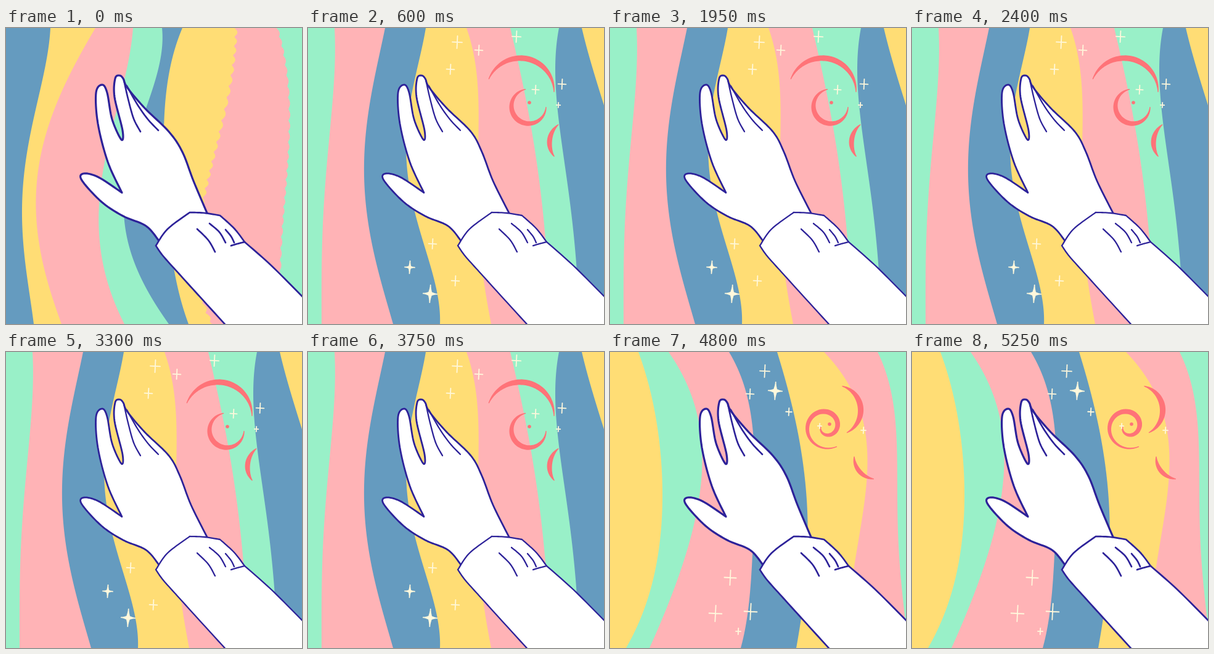
An HTML page with a canvas for the animation above (5.4 s loop, 480 px wide and 480 px high).

```html
<!DOCTYPE html>
<html lang="en">
<head>
<meta charset="utf-8">
<title>Waving hand</title>
<style>
  html, body { margin: 0; width: 100%; height: 100%; overflow: hidden; }
  canvas { display: block; width: 480px; height: 480px; }
</style>
</head>
<body>
<canvas id="stage" width="480" height="480"></canvas>
<script>
const ctx = document.getElementById('stage').getContext('2d');
const SIZE = 480, STEP = 150;
const COLORS = { b: '#659bbf', y: '#ffdd75', p: '#ffb3b6', g: '#99f0c8' };
const INK = '#2d2299', CORAL = '#ff7378', CREAM = '#fff8dc';

// Heights of the five key points of every stripe edge (Chebyshev nodes)
const LEVELS = [0, 1, 2, 3, 4].map(i => SIZE / 2 * (1 - Math.cos(Math.PI * i / 4)));

function polygon(pts) {
  const path = new Path2D();
  pts.forEach(([x, y]) => path.lineTo(x, y));
  return path;
}

function spline(pts, detail = 10) {
  const out = [pts[0]];
  for (let i = 0; i < pts.length - 1; i++) {
    const b = pts[i], c = pts[i + 1], a = pts[i - 1] || b, d = pts[i + 2] || c;
    for (let s = 1; s <= detail; s++) {
      const t = s / detail;
      out.push([0, 1].map(k => b[k] + 0.5 * t * (c[k] - a[k] +
        t * (2 * a[k] - 5 * b[k] + 4 * c[k] - d[k] +
        t * (3 * (b[k] - c[k]) + d[k] - a[k])))));
    }
  }
  return out;
}

// "x y x y ..." becomes a smooth line; "|" marks a sharp corner
function curve(text) {
  return text.split('|').flatMap(part => {
    const n = part.trim().split(/\s+/).map(Number);
    return spline(Array.from({ length: n.length / 2 }, (_, i) => [n[2 * i], n[2 * i + 1]]));
  });
}

// Quartic through the key points of an edge
function edgeAt(y, xs) {
  return xs.reduce((sum, x, i) => sum + LEVELS.reduce((term, level, j) =>
    j === i ? term : term * (y - level) / (LEVELS[i] - level), x), 0);
}

// Everything left of an edge; scallop adds small round bumps
function stripe(xs, scallop) {
  const pts = [[0, 0]];
  for (let y = 0; y <= SIZE; y += 2) {
    const bump = Math.abs(Math.sin(y / 5.2 + Math.sin(y / 40))) - 0.5;
    pts.push([edgeAt(y, xs) + scallop * bump, y]);
  }
  return polygon([...pts, [0, SIZE]]);
}

// Brush mark along a spiral arc, thin at both ends; angles in degrees
function swirl(cx, cy, r0, r1, from, to, width) {
  const outer = [], inner = [];
  for (let t = 0; t <= 1; t += 1 / 64) {
    const angle = (from + (to - from) * t) * Math.PI / 180;
    const r = r0 + (r1 - r0) * t, w = 0.6 + width / 2 * Math.sin(Math.PI * t);
    const at = d => [cx + d * Math.cos(angle), cy + d * Math.sin(angle)];
    outer.push(at(r + w));
    inner.unshift(at(r - w));
  }
  return polygon([...outer, ...inner]);
}

// lean moves the back of the hand sideways
const hand = lean => polygon(curve(
  '248 345 227 321 190 305 155 282 123 247 126 236 150 242 188 267 | ' +
  '188 267 165 217 149 155 146 105 156 92 164 105 172 148 187 181 189 166 176 112 ' +
  `177 82 184 77 190 82 197 97 225 130 264 168 ${286 + lean} 201 ${304 + lean} 248 326 300`));

const cuff = curve('243 353 262 326 298 299 | 298 299 322 300 347 304 | ' +
  '347 304 370 325 387 347 | 387 347 430 385 480 435 490 446');
const arm = curve('243 353 255 370 281 399 310 431 362 488');
const sleeve = polygon([...cuff, [490, 490], ...arm.slice().reverse()]);
const fingers = ['191 84 198 115 207 147 218 168', '196 94 213 124 230 148 247 166']
  .map(text => polygon(curve(text)));
const folds = ['310 326 328 344 339 363', '330 317 346 331 356 348', '356 327 365 338 370 348',
  '365 353 375 350 387 347'].map(text => polygon(curve(text)));

const scenes = [
  {
    order: 'bypgbypg',
    edges: [
      [72, 62, 29, 35, 45], [145, 106, 51, 67, 90], [206, 195, 156, 164, 192],
      [253, 246, 195, 221, 264], [286, 265, 257, 276, 296],
      [373, 367, 329, 312, 334], [440, 455, 455, 445, 450]
    ],
    scallop: { 5: 5, 6: 3 },
    lean: 0, width: 3,
    swirls: [], plus: [], stars: []
  },
  {
    order: 'gpbypgby',
    edges: [
      [43, 43, 29, 22, 22], [125, 110, 91, 118, 138], [191, 176, 162, 205, 214],
      [257, 273, 275, 285, 297], [328, 344, 374, 390, 394],
      [407, 401, 419, 437, 441], [444, 463, 515, 560, 580]
    ],
    lean: -4, width: 2.6,
    swirls: [
      [345, 104, 56, 54, 202, 360, 8], [358, 127, 28, 28, -100, -358, 7],
      [428, 190, 40, 34, -123, -213, 7]
    ],
    dot: [359, 121],
    plus: [[242, 23, 10], [277, 36, 8], [231, 67, 8], [338, 14, 9], [369, 100, 7],
      [412, 91, 8], [406, 125, 4], [202, 350, 8], [239, 410, 8]],
    stars: [[165, 388, 10], [198, 431, 14]]
  },
  {
    order: 'ygpbypg',
    edges: [
      [46, 67, 85, 58, 26], [95, 132, 144, 94, 64], [193, 222, 234, 225, 212],
      [271, 291, 319, 313, 302], [347, 396, 413, 388, 385], [434, 457, 466, 476, 484]
    ],
    lean: 0, width: 3,
    swirls: [
      [366, 94, 40, 41, -75, 64, 8], [350, 121, 37, 8, 61, 540, 7],
      [431, 170, 35, 36, 181, 95, 6]
    ],
    dot: [356, 117],
    plus: [[251, 31, 10], [227, 68, 8], [290, 97, 6], [340, 120, 4], [411, 127, 5],
      [195, 366, 12], [171, 424, 13], [228, 421, 13], [208, 453, 5]],
    stars: [[268, 63, 14]]
  }
];

function fill(path, color) {
  ctx.fillStyle = color;
  ctx.fill(path);
}

// Four-pointed star; a waist of 0 leaves a bare plus sign
function spark([x, y, r], waist) {
  const k = r * waist, w = r * 0.8;
  ctx.save();
  ctx.translate(x, y);
  ctx.rotate(0.05);
  ctx.lineWidth = 1.8;
  ctx.strokeStyle = CREAM;
  ctx.stroke(new Path2D(`M0 ${-r}V${r}M${-w} 0H${w}`));
  fill(polygon([[0, -r], [k, -k], [w, 0], [k, k], [0, r], [-k, k], [-w, 0], [-k, -k]]), CREAM);
  ctx.restore();
}

function draw(s) {
  ctx.lineCap = ctx.lineJoin = 'round';
  ctx.fillStyle = COLORS[s.order.at(-1)];
  ctx.fillRect(0, 0, SIZE, SIZE);
  for (let i = s.edges.length - 1; i >= 0; i--) {
    fill(stripe(s.edges[i], s.scallop?.[i] ?? 0), COLORS[s.order[i]]);
  }

  s.swirls.forEach(args => fill(swirl(...args), CORAL));
  if (s.dot) {
    const dot = new Path2D();
    dot.arc(...s.dot, 2.8, 0, 2 * Math.PI);
    fill(dot, CORAL);
  }
  s.plus.forEach(p => spark(p, 0));
  s.stars.forEach(p => spark(p, 0.2));

  const palm = hand(s.lean);
  ctx.strokeStyle = INK;
  ctx.lineWidth = s.width + 0.2;
  fill(palm, '#fff');
  ctx.stroke(palm);
  ctx.lineWidth = s.width - 0.3;
  fill(sleeve, '#fff');
  [sleeve, ...fingers, ...folds].forEach(path => ctx.stroke(path));
}

let shown = -1;
const start = performance.now();
function tick() {
  const now = Math.max(0, performance.now() - start);
  const pose = Math.floor(now / STEP) % scenes.length;
  if (pose !== shown) draw(scenes[shown = pose]);
  requestAnimationFrame(tick);
}
tick();
</script>
</body>
</html>
```
